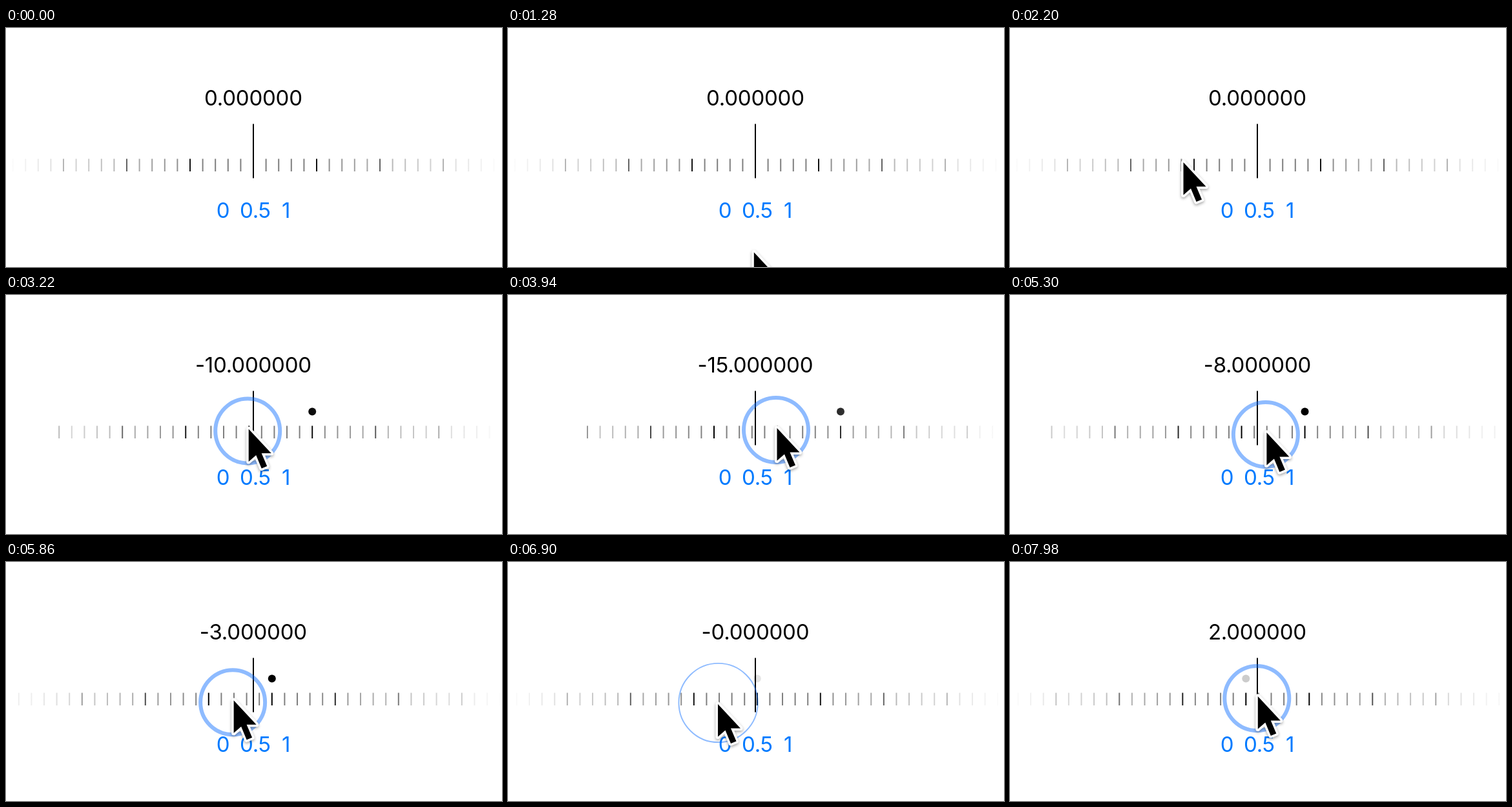
An HTML page for the animation above (8 s loop, 768 px wide and 370 px high).

```html
<!DOCTYPE html>
<html lang="en">
<head>
<meta charset="utf-8">
<title>Ruler slider</title>
<style>
  html, body { margin: 0; width: 100%; height: 100%; overflow: hidden; background: #fff; }
  svg { display: block; width: 768px; height: 370px; }
  text { font: 400 33px Inter, Roboto, sans-serif; text-anchor: middle; letter-spacing: -.22px; }
  .steps { fill: #007aff; }
  #ring { fill: none; stroke: #0a6cff; stroke-opacity: .46; }
  #cursor { filter: drop-shadow(0 2px 2px rgba(0, 0, 0, .35)); }
</style>
</head>
<body>
<svg viewBox="0 0 768 370">
  <defs>
    <linearGradient id="fade">
      <stop offset="0" stop-color="#fff" stop-opacity="0"/>
      <stop offset=".4" stop-color="#fff"/>
      <stop offset=".6" stop-color="#fff"/>
      <stop offset="1" stop-color="#fff" stop-opacity="0"/>
    </linearGradient>
    <mask id="edges" maskUnits="userSpaceOnUse" x="0" y="0" width="768" height="370">
      <rect width="768" height="370" fill="url(#fade)"/>
    </mask>
  </defs>
  <text id="label" x="382.9" y="119.5"></text>
  <g mask="url(#edges)">
    <g id="scale"><circle id="dot" cy="180.5" r="6"/></g>
  </g>
  <rect x="382" y="148.5" width="2" height="84"/>
  <g class="steps">
    <text x="336" y="294">0</text>
    <text x="386" y="294">0.5</text>
    <text x="433.5" y="294">1</text>
  </g>
  <circle id="ring"/>
  <path id="cursor" d="M.5 3V53.5L12 43.5L20.5 64L29 60.5L20.5 40.5H35.5Z"
    stroke="#fff" stroke-width="7" stroke-linejoin="round" paint-order="stroke"/>
</svg>
<script>
const LOOP = 8000, CENTER = 383, GAP = 19.6, UNIT = 20 * GAP / 45;
const SLACK = 10, SNAP = 500, BURST = 250, FADE = 230;
const el = id => document.getElementById(id);
const clamp = v => Math.min(1, Math.max(0, v));
const smooth = p => p * p * (3 - 2 * p);
const easeOut = p => 1 - (1 - p) ** 2;

// cursor moves: each eases from the previous place to x, y
const entry = [402, 376];
const moves = [
  { from: 1060, to: 1860, x: 286, y: 206 },
  { from: 1900, to: 2200, x: 268, y: 205 },
  { from: 2200, to: 2280, x: 274, y: 208 },
  { from: 2420, to: 3660, x: 416, y: 203 },
  { from: 3980, to: 4660, x: 464, y: 208 },
  { from: 4740, to: 6710, x: 326.6, y: 212, ease: easeOut },
  { from: 6785, to: 6890, x: 324.5, y: 217 },
  { from: 6900, to: 7320, x: 411, y: 205 },
  { from: 7620, to: 7960, x: 383.3, y: 205 }
];
const drags = [[2420, 3960], [4660, 6785], [7620, Infinity]];
const dotShown = [[2540, 6695], [7935, Infinity]];

function tip(t) {
  let [x, y] = entry;
  for (const m of moves) {
    const p = (m.ease || smooth)(clamp((t - m.from) / (m.to - m.from)));
    x += (m.x - x) * p;
    y += (m.y - y) * p;
  }
  return [x, y];
}

const toStep = off => Math.trunc(off / UNIT + Math.sign(off) * 1e-6);

// the ruler follows each drag past a dead zone, then snaps to a whole step
function offsetAt(t) {
  let off = 0;
  for (const [down, up] of drags) {
    if (t < down) break;
    const move = tip(Math.min(t, up))[0] - tip(down)[0];
    off += Math.sign(move) * Math.max(0, Math.abs(move) - SLACK);
    if (t > up) off += (toStep(off) * UNIT - off) * smooth(clamp((t - up) / SNAP));
  }
  return off;
}

function dotOpacity(t) {
  const ramp = start => clamp((t - start) / FADE);
  return dotShown.reduce((sum, [on, off]) => sum + ramp(on) - ramp(off), 0);
}

function drawRing(t) {
  const ring = el('ring');
  const drag = drags.find(([down, up]) => t >= down && t < up + BURST);
  ring.style.display = drag ? '' : 'none';
  if (!drag) return;
  const [down, up] = drag, [x, y] = tip(Math.min(t, up));
  const p = clamp((t - up) / BURST);
  ring.setAttribute('cx', x - 1);
  ring.setAttribute('cy', y + 6);
  ring.setAttribute('r', 50 + 24 * p);
  ring.setAttribute('stroke-width', 6 * (1 - p) ** 1.8);
  ring.setAttribute('opacity', clamp((t - down) / 100));
}

for (let i = -20; i <= 20; i++) {
  const tick = document.createElementNS('http://www.w3.org/2000/svg', 'rect');
  const attrs = { x: i * GAP - 1, y: 202.5, width: 2, height: 19.5, opacity: i % 5 ? .5 : 1 };
  for (const k in attrs) tick.setAttribute(k, attrs[k]);
  el('scale').append(tick);
}

function draw(t) {
  const off = offsetAt(t), [x, y] = tip(t);
  el('scale').setAttribute('transform', `translate(${CENTER + off} 0)`);
  el('dot').setAttribute('opacity', dotOpacity(t));
  el('label').textContent = (off > 0 ? '-' : '') + Math.abs(toStep(off)).toFixed(6);
  el('cursor').setAttribute('transform', `translate(${x} ${y})`);
  drawRing(t);
}

const start = performance.now();
function frame() {
  draw((performance.now() - start) % LOOP);
  requestAnimationFrame(frame);
}
frame();
</script>
</body>
</html>
```
